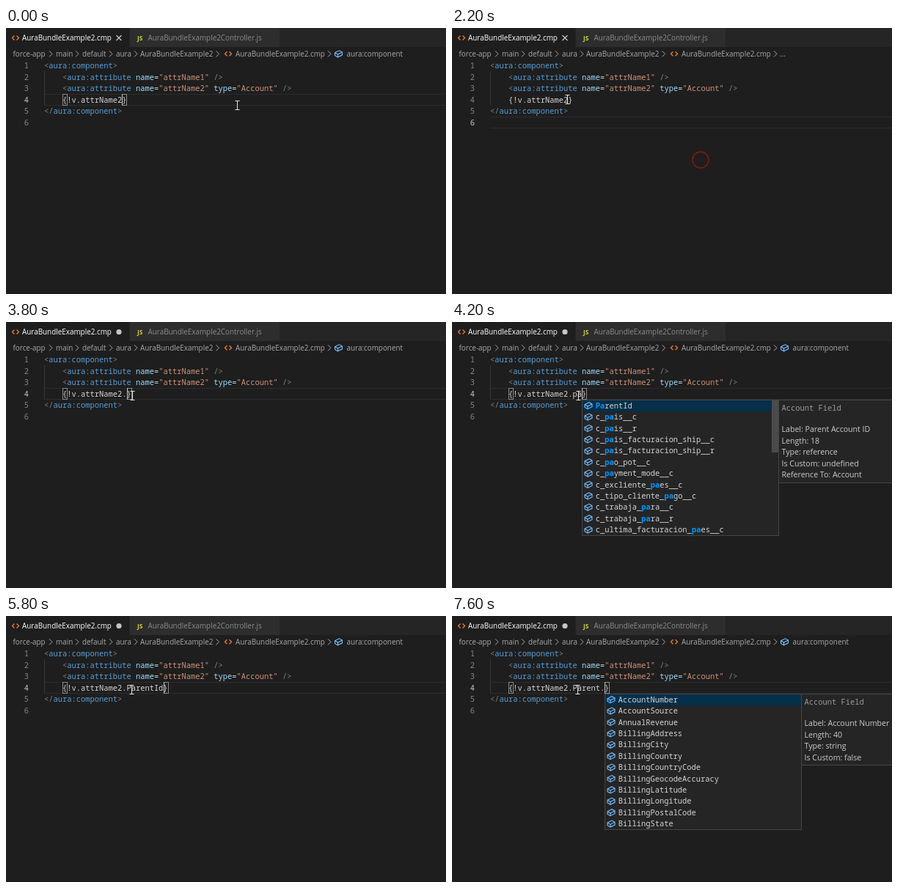
Animation, 600 px wide and 363 px high, one loop 8000 ms. Source, as an HTML page with a canvas:

```html
<!DOCTYPE html>
<html>
<head>
<meta charset="utf-8">
<style>
html, body { margin: 0; width: 100%; height: 100%; overflow: hidden; background: #1e1e1e; }
canvas { display: block; width: 600px; height: 363px; }
</style>
</head>
<body>
<canvas id="stage"></canvas>
<script>
const canvas = document.getElementById('stage');
const ctx = canvas.getContext('2d');
const scale = window.devicePixelRatio || 1;
canvas.width = 600 * scale;
canvas.height = 363 * scale;

const LOOP = 8000, STEP = 200;
const CHAR = 6.25, LEFT = 52, ROW = 15.5, LIST_ROW = 15.4;
const MONO = '10.417px "Noto Sans Mono", monospace';
const UI = '9.9px "Open Sans", sans-serif';
const DETAIL = '10.6px "Open Sans", sans-serif';
const C = { tag: '#569cd6', punct: '#808080', attr: '#9cdcfe', string: '#ce9178', text: '#d4d4d4',
  crumb: '#a9a9a9', orange: '#e37933', blue: '#75beff', match: '#0097fb' };

const accountItems = ['ParentId', 'c_pais__c', 'c_pais__r', 'c_pais_facturacion_ship__c',
  'c_pais_facturacion_ship__r', 'c_pao_pot__c', 'c_payment_mode__c', 'c_excliente_paes__c',
  'c_tipo_cliente_pago__c', 'c_trabaja_para__c', 'c_trabaja_para__r', 'c_ultima_facturacion_paes__c'];
const parentItems = ['AccountNumber', 'AccountSource', 'AnnualRevenue', 'BillingAddress', 'BillingCity',
  'BillingCountry', 'BillingCountryCode', 'BillingGeocodeAccuracy', 'BillingLatitude',
  'BillingLongitude', 'BillingPostalCode', 'BillingState'];
const parentIdDetail = ['Label: Parent Account ID', 'Length: 18', 'Type: reference',
  'Is Custom: undefined', 'Reference To: Account'];
const numberDetail = ['Label: Account Number', 'Length: 40', 'Type: string', 'Is Custom: false'];

const typed = [[0, ''], [3800, '.'], [4000, '.p'], [4200, '.pa'], [4400, '.par'], [4600, '.paren'],
  [4800, '.parent'], [5600, '.ParentId'], [6200, '.ParentI'], [6400, '.Parent'], [7400, '.Parent.']];
const activeLines = [[0, 4], [600, 3], [1400, 6], [2600, 4]];
const mousePath = [[0, 315, 105], [400, 338, 83], [800, 338, 83], [1200, 339, 181], [1800, 339, 181],
  [2200, 157, 97], [2600, 159, 97], [3000, 172, 100], [5400, 172, 100], [5800, 171, 100], [8000, 171, 100]];

const latest = (keys, t) => keys.filter(k => k[0] <= t).pop()[1];
const within = (t, from, to) => t >= from && t < to;

function mouseAt(t) {
  const i = mousePath.findIndex(k => k[0] > t);
  const [t0, x0, y0] = mousePath[i - 1], [t1, x1, y1] = mousePath[i];
  const p = (t - t0) / (t1 - t0);
  return [x0 + (x1 - x0) * p, y0 + (y1 - y0) * p];
}

function rect(x, y, w, h, color) {
  ctx.fillStyle = color;
  ctx.fillRect(x, y, w, h);
}

function frame(x, y, w, h, color) {
  ctx.strokeStyle = color;
  ctx.lineWidth = 1;
  ctx.strokeRect(x + .5, y + .5, w - 1, h - 1);
}

function text(str, x, y, color, font = UI) {
  ctx.font = font;
  ctx.fillStyle = color;
  ctx.fillText(str, x, y);
}

function path(points, color, width = 1, closed = false) {
  ctx.beginPath();
  points.forEach(([x, y]) => ctx.lineTo(x, y));
  if (closed) ctx.closePath();
  ctx.strokeStyle = color;
  ctx.lineWidth = width;
  ctx.stroke();
}

function circle(x, y, r) {
  ctx.beginPath();
  ctx.arc(x, y, r, 0, 7);
}

function chevron(x, y) {
  path([[x - 2, y - 4], [x + 2, y], [x - 2, y + 4]], C.crumb);
}

function codeIcon(x, y) {
  path([[x - 1.5, y - 3], [x - 4.5, y], [x - 1.5, y + 3]], C.orange, 1.4);
  path([[x + 1.5, y - 3], [x + 4.5, y], [x + 1.5, y + 3]], C.orange, 1.4);
}

function boxIcon(x, y) {
  const at = points => points.map(([dx, dy]) => [x + dx, y + dy]);
  path(at([[-5, -1.5], [1, -4.5], [5, -2.3], [5, 1.5], [-1, 4.5], [-5, 2.2]]), C.blue, 1.1, true);
  path(at([[-5, -1.5], [-1, .8], [5, -2.3]]), C.blue, 1.1);
  path(at([[-1, .8], [-1, 4.5]]), C.blue, 1.1);
}

const columnX = col => LEFT + col * CHAR;
const rowTop = line => 43.7 + (line - 1) * ROW;

// Draws [string, color] runs one after another on the character grid.
function codeLine(line, col, runs) {
  for (const [str, color] of runs) {
    text(str, columnX(col), rowTop(line) + 11.3, color, MONO);
    col += str.length;
  }
}

function attribute(name, value) {
  return [[name, C.attr], ['=', C.text], [`"${value}"`, C.string]];
}

function drawTabs(dirty) {
  rect(0, 0, 600, 26, '#252526');
  rect(0, 0, 168, 26, '#1e1e1e');
  rect(169, 0, 204, 26, '#2d2d2d');
  codeIcon(13, 13.5);
  text('AuraBundleExample2.cmp', 22, 17, '#ffffff');
  if (dirty) {
    circle(154, 13.5, 3.6);
    ctx.fillStyle = '#c5c5c5';
    ctx.fill();
  } else {
    path([[150.5, 10], [157.5, 17]], '#d0d0d0', 1.1);
    path([[157.5, 10], [150.5, 17]], '#d0d0d0', 1.1);
  }
  text('JS', 179, 16.5, '#cbcb41', 'bold 8.5px "Open Sans", sans-serif');
  text('AuraBundleExample2Controller.js', 193.5, 17, '#8b8b8b');
}

function drawBreadcrumbs(line) {
  const y = 35.3, base = 38.6;
  [['force-app', 9.5], ['main', 68], ['default', 104], ['aura', 150], ['AuraBundleExample2', 183],
    ['AuraBundleExample2.cmp', 313]].forEach(([str, x]) => text(str, x, base, C.crumb));
  [61, 97, 143, 177, 288.5, 441].forEach(x => chevron(x, y));
  codeIcon(303, y);
  if (line === 6) {
    text('...', 447, base, C.crumb);
    return;
  }
  boxIcon(453.5, y);
  text('aura:component', 464.5, base, C.crumb);
  if (line === 3) {
    chevron(548, y);
    boxIcon(561, y);
    text('aura:attribute', 572, base, C.crumb);
  }
}

function drawEditor(t, line, suffix) {
  const selecting = line === 3;
  const caretCol = line === 4 ? 17 + suffix.length : 0;
  if (!selecting) {
    const y = Math.round(rowTop(line));
    rect(LEFT, y, 548, 1, '#2c2c2c');
    rect(LEFT, y + 15, 548, 1, '#2c2c2c');
  }
  rect(LEFT, Math.round(rowTop(2)), 1, 46, '#383838');
  if (selecting) rect(columnX(43), rowTop(3), 7 * CHAR, ROW, '#264f78');

  ctx.textAlign = 'right';
  for (let n = 1; n <= 6; n++) {
    text(n, 31, rowTop(n) + 11.3, n === line ? '#c6c6c6' : '#858585', MONO);
  }
  ctx.textAlign = 'left';

  const open = ['<', C.punct], close = [' />', C.punct], space = [' ', C.text];
  codeLine(1, 0, [open, ['aura:component', C.tag], ['>', C.punct]]);
  codeLine(2, 4, [open, ['aura:attribute', C.tag], space, ...attribute('name', 'attrName1'), close]);
  codeLine(3, 4, [open, ['aura:attribute', C.tag], space, ...attribute('name', 'attrName2'), space,
    ...attribute('type', 'Account'), close]);
  codeLine(4, 4, [[`{!v.attrName2${suffix}}`, C.text]]);
  codeLine(5, 0, [['</', C.punct], ['aura:component', C.tag], ['>', C.punct]]);

  if (line === 4) {
    for (const col of [4, caretCol]) frame(Math.round(columnX(col)), 90, 7, 16, '#888888');
  }
  const blinkOff = [[1800, 2600], [3000, 3400], [5200, 5600], [7000, 7400]].some(([a, b]) => within(t, a, b));
  if (!blinkOff) {
    rect(Math.round(columnX(selecting ? 50 : caretCol)), rowTop(line), 1, ROW, '#c8c8c8');
  }
}

function drawSuggestions(x, items, prefix, details, scrollbar) {
  const top = 106, width = 268, height = items.length * LIST_ROW + 1;
  const detailX = x + width, detailHeight = 36 + details.length * 15.6;
  rect(x, top, width + 1, height, '#252526');
  rect(x + 1, top + 1, width - 1, LIST_ROW, '#062f4a');
  if (scrollbar) rect(x + 259, top + 1, 9, 71, '#4b4b4c');
  frame(x, top, width + 1, Math.round(height), '#454545');

  items.forEach((item, i) => {
    const y = top + 8.2 + i * LIST_ROW;
    const start = prefix ? item.toLowerCase().indexOf(prefix) : 0;
    const end = start + prefix.length;
    boxIcon(x + 9, y);
    [[0, start, C.text, ''], [start, end, C.match, 'bold '], [end, item.length, C.text, '']]
      .forEach(([a, b, color, weight]) =>
        text(item.slice(a, b), x + 18.7 + a * CHAR, y + 3.6, color, weight + MONO));
  });

  rect(detailX, top, 600 - detailX, detailHeight, '#252526');
  frame(detailX, top, 610 - detailX, Math.round(detailHeight), '#454545');
  text('Account Field', detailX + 4.5, 120.5, '#9a9a9a', MONO);
  details.forEach((str, i) => text(str, detailX + 4.5, 150 + i * 15.5, '#cccccc', DETAIL));
}

function drawClickRing(t) {
  const age = (t - 1600) / 1000;
  if (age < 0 || age >= 1) return;
  circle(339, 180, 15 - age * 6.7);
  ctx.strokeStyle = `rgba(205, 20, 20, ${1 - age * .6})`;
  ctx.lineWidth = 1.3;
  ctx.stroke();
}

function drawMouse(t) {
  const [x, y] = mouseAt(t).map(v => Math.round(v) + .5);
  path([[x, y - 6], [x, y + 6]], '#e4e4e4', 1);
  for (const end of [-6, 6]) path([[x - 3, y + end], [x + 3, y + end]], '#e4e4e4', 1);
}

function draw(t) {
  const line = latest(activeLines, t);
  const suffix = latest(typed, t);
  ctx.setTransform(scale, 0, 0, scale, 0, 0);
  rect(0, 0, 600, 363, '#1e1e1e');
  drawTabs(t >= 3800);
  drawBreadcrumbs(line);
  drawEditor(t, line, suffix);
  if (within(t, 4000, 5600)) {
    const prefix = suffix.slice(1);
    const items = accountItems.filter(item => item.toLowerCase().includes(prefix));
    drawSuggestions(177, items, prefix, parentIdDetail, items.length > 11);
  }
  if (t >= 7600) drawSuggestions(208, parentItems, '', numberDetail, false);
  drawClickRing(t);
  drawMouse(t);
}

function tick() {
  const t = performance.now() % LOOP;
  draw(Math.floor(t / STEP) * STEP);
  requestAnimationFrame(tick);
}
tick();
</script>
</body>
</html>
```
